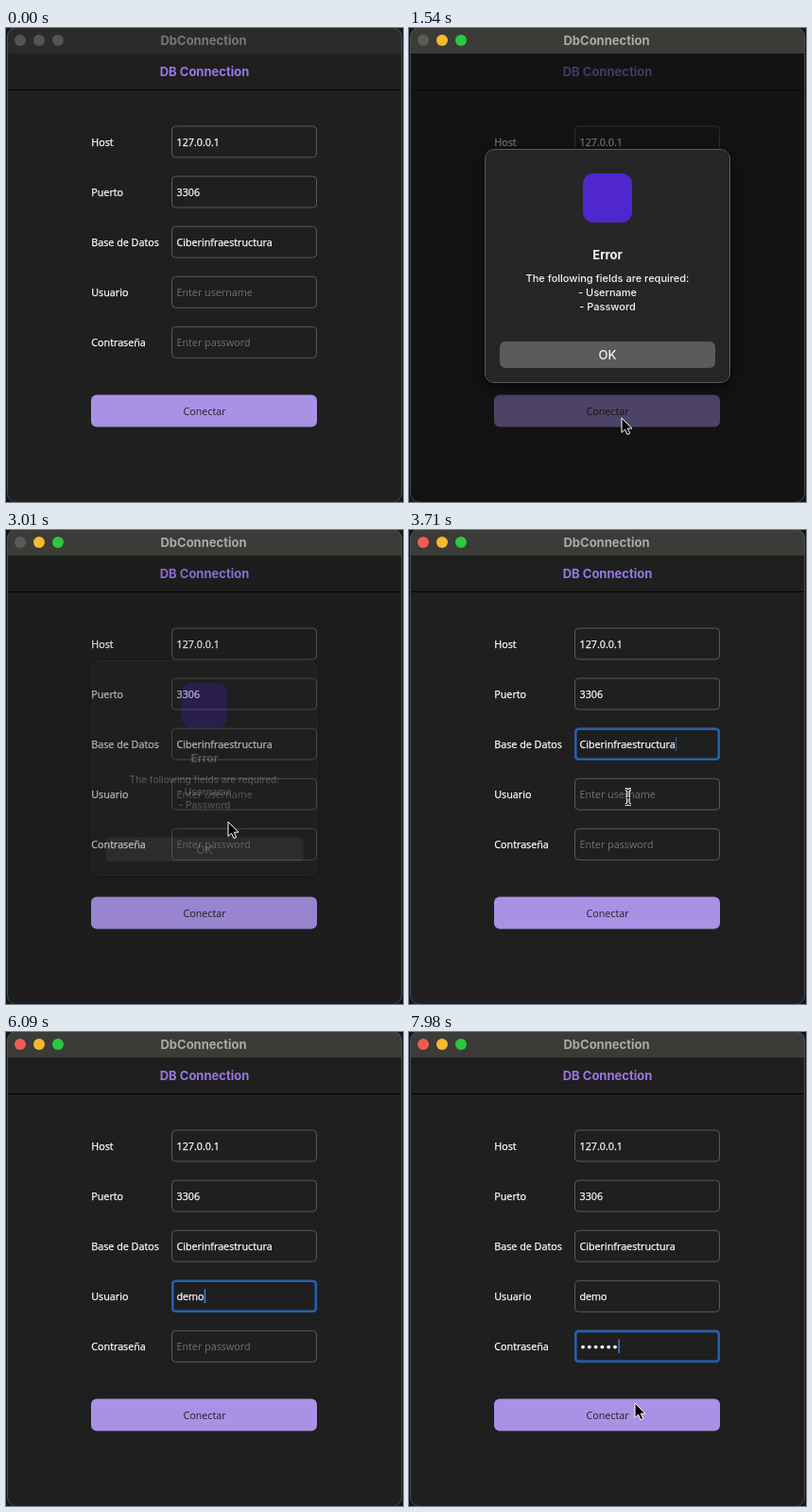
Write an HTML page that moves like this. It is 420 px wide and 502 px high and loops after 8000 ms.

```html
<!DOCTYPE html>
<html lang="es">
<head>
<meta charset="utf-8">
<title>DbConnection</title>
<style>
  html, body { margin: 0; width: 100%; height: 100%; overflow: hidden; background: #10181d; }
  svg { display: block; width: 420px; height: 502px; }
  text { font: 10.76px "Open Sans", sans-serif; }
  .ui { font: 500 11px Inter, sans-serif; text-anchor: middle; fill: #f4f4f4; }
  .bold { font-size: 13px; font-weight: 700; }
  .mid { text-anchor: middle; }
  .form { fill: #fff; stroke: #fff; stroke-width: .25px; }
  .hint { fill: #737373; stroke: none; }
  .box { fill: #1f1f1f; stroke: #5a5a5a; }
  .focus { fill: none; stroke: #2560ac; stroke-width: 2.6; }
  #alert, #popup { filter: drop-shadow(0 5px 6px rgba(0, 0, 0, .5)); }
</style>
</head>
<body>
<svg viewBox="0 0 420 502">
  <clipPath id="frame"><rect x="1" y="-1" width="418" height="503" rx="10"/></clipPath>
  <g clip-path="url(#frame)">
    <rect width="420" height="502" fill="#1f1f1f"/>
    <text class="ui bold" x="210" y="51" style="fill:#9877e4">DB Connection</text>
    <path d="M0 65.5H420" stroke="#050505"/>
    <g id="form"></g>
    <rect x="90" y="388.5" width="239" height="34" rx="6" fill="#a992e6"/>
    <text class="mid" x="210" y="409.8" fill="#1f1f1f">Conectar</text>
    <rect id="dim" y="27" width="420" height="475" fill="#0c0c0c"/>
    <rect id="bar" width="420" height="27"/>
    <text id="title" class="ui bold" x="209" y="17.5">DbConnection</text>
    <circle id="red" cx="15" cy="13" r="6"/>
    <circle id="yellow" cx="35" cy="13" r="6"/>
    <circle id="green" cx="55" cy="13" r="6"/>
  </g>
  <rect x="1.5" y="-.5" width="417" height="503" rx="10" fill="none" stroke="#555" stroke-opacity=".8"/>

  <g id="alert">
    <rect x="80" y="128" width="260" height="248" rx="10" fill="#262626" stroke="#080808" stroke-width="2"/>
    <rect x="80.5" y="128.5" width="259" height="247" rx="9.5" fill="none" stroke="#5c5c5c"/>
    <rect x="184" y="154" width="52" height="52" rx="11" fill="#5027cf"/>
    <text class="ui bold" x="210" y="245">Error</text>
    <text class="ui" x="210" y="269">The following fields are required:</text>
    <text class="ui" x="210" y="284">- Username</text>
    <text class="ui" x="210" y="299">- Password</text>
    <rect id="ok" x="96" y="332" width="228" height="28" rx="6"/>
    <text class="ui" x="210" y="350.5" style="font-size:13px">OK</text>
  </g>

  <g id="popup">
    <rect x="178.5" y="354.5" width="98" height="34" rx="6" fill="#303030" stroke="#555"/>
    <text class="ui" x="227.5" y="375.5">Passwords…</text>
  </g>

  <g id="ring" fill="none">
    <circle r="20" stroke="#000" stroke-width="5.5"/>
    <circle r="20" stroke="#fff" stroke-width="2.2"/>
  </g>
  <path id="arrow" d="M0 0V15.4L3.6 12.2L6 17.6L8.7 16.4L6.3 11.1H11Z" fill="#000" stroke="#fff"/>
  <g id="beam" fill="none">
    <path id="stem" d="M-3-8Q0-8 0-6Q0-8 3-8M0-6V6M-3 8Q0 8 0 6Q0 8 3 8M-2 1H2" stroke="#fff" stroke-width="3"/>
    <use href="#stem" style="stroke:#000"/>
    <path d="M-3-8Q0-8 0-6Q0-8 3-8M0-6V6M-3 8Q0 8 0 6Q0 8 3 8M-2 1H2" stroke="#000" stroke-width="1.1"/>
  </g>
</svg>
<script>
const LOOP = 8000, STEP = 70;
const $ = id => document.getElementById(id);
const clamp = v => Math.max(0, Math.min(1, v));
const show = (el, on) => el.setAttribute('opacity', Number(on));
const paint = (id, color) => $(id).style.fill = color;

const rows = [
  ['Host', '127.0.0.1'],
  ['Puerto', '3306'],
  ['Base de Datos', 'Ciberinfraestructura'],
  ['Usuario', '', 'Enter username'],
  ['Contraseña', '', 'Enter password']
];
const userKeys = [5320, 5880, 5950, 6090];
const passKeys = [7140, 7210, 7280, 7420, 7560, 7630];

// time, x, y of the pointer
const route = [
  [420, 322, 488], [560, 267, 446], [700, 231, 418], [770, 225, 413],
  [1610, 225, 413], [2170, 233, 284], [2450, 236, 338],
  [2800, 236, 338], [3010, 235, 309], [3150, 232, 283],
  [5320, 231.5, 282], [7630, 236, 322], [7980, 239, 393]
];
// start, end, x, y of each click mark
const clicks = [
  [980, 1120, 225, 415], [2660, 2800, 236, 340],
  [3290, 3430, 232, 286], [4410, 4620, 231, 283, .8]
];

$('form').innerHTML = rows.map(([label], i) => {
  const y = 104 + i * 53.1;
  return `<rect class="box" x="175.5" y="${y}" width="153" height="33" rx="4"/>
    <rect class="focus" x="176.3" y="${y + .5}" width="151.5" height="32" rx="3"/>
    <text class="form" x="90.3" y="${y + 20.8}">${label}</text>
    <text class="form value" x="180.5" y="${y + 20.8}"></text>
    <g class="dots" fill="#fff"></g>
    <rect class="caret" y="${y + 9}" width="1.4" height="15" fill="#3f83e2"/>`;
}).join('');
const all = name => [...document.querySelectorAll('.' + name)];
const [focusRings, values, carets] = ['focus', 'value', 'caret'].map(all);
const dots = all('dots')[4];
dots.innerHTML = passKeys.map((_, i) => `<circle cx="${184 + i * 6.8}" cy="333.6" r="1.9"/>`).join('');

function pointer(t) {
  const next = route.findIndex(p => p[0] > t);
  if (next < 0) return route[route.length - 1].slice(1);
  if (next === 0) return route[0].slice(1);
  const [t0, x0, y0] = route[next - 1], [t1, x1, y1] = route[next];
  const k = (t - t0) / (t1 - t0);
  return [x0 + (x1 - x0) * k, y0 + (y1 - y0) * k];
}

function focusedRow(t) {
  if (t >= 6650) return 4;
  if (t >= 4760) return 3;
  return (t >= 980 && t < 2800) || t >= 3570 ? 2 : -1;
}

function caretAlpha(t) {
  if (t < 3710 || t >= 4200) return 1;
  if (t < 3780) return .5;
  return t < 4060 ? 0 : (t - 4060) / 140 * .6 + .2;
}

function drawForm(t) {
  const typed = keys => keys.filter(k => t >= k).length;
  const user = 'demo'.slice(0, typed(userKeys)), count = typed(passKeys);
  const focus = focusedRow(t);
  rows.forEach(([, text, hint], i) => {
    const value = i === 3 ? user : text;
    const empty = !value && !(i === 4 && count);
    values[i].textContent = value || (empty ? hint : '');
    values[i].classList.toggle('hint', empty);
    show(focusRings[i], i === focus);
    const width = i === 4 ? count * 6.8 : value ? values[i].getComputedTextLength() : 0;
    carets[i].setAttribute('x', 180.6 + width);
    show(carets[i], i === focus ? caretAlpha(t) : 0);
  });
  [...dots.children].forEach((dot, i) => show(dot, i < count));
  show($('popup'), t >= 6720 && t < 7140);
}

function drawWindow(t) {
  const active = t >= 980, modal = t >= 1120 && t < 3220;
  paint('bar', active ? '#3b3b38' : '#2b2b2b');
  paint('title', active ? '#aaaaa8' : '#777');
  paint('red', !active ? '#545454' : modal ? '#5b5b59' : '#ee5c54');
  paint('yellow', active ? '#f6b92f' : '#545454');
  paint('green', active ? '#2cc840' : '#545454');
}

function drawAlert(t) {
  const opening = clamp((t - 1120) / 280), closing = clamp((t - 2870) / 280);
  const scale = .88 + .12 * opening - .16 * closing;
  const alert = $('alert');
  show(alert, opening ** .7 * (1 - closing) ** 2);
  alert.setAttribute('transform', `translate(210 252) scale(${scale}) translate(-210 -252)`);
  show($('dim'), .58 * opening ** 1.3 * (1 - closing) ** 2.5);
  paint('ok', t >= 2660 && t < 2800 ? '#838383' : '#5b5b5b');
}

function drawPointer(t) {
  const [x, y] = pointer(t);
  const visible = (t >= 420 && t < 5320) || t >= 7700;
  const beam = t >= 3150 && y < 350;
  for (const id of ['arrow', 'beam']) {
    $(id).setAttribute('transform', `translate(${x} ${y})`);
    show($(id), visible && beam === (id === 'beam'));
  }
  const click = clicks.find(([from, to]) => t >= from && t < to);
  show($('ring'), !!click);
  if (click) $('ring').setAttribute('transform', `translate(${click[2]} ${click[3]}) scale(${click[4] || 1})`);
}

function draw() {
  const t = Math.floor(performance.now() % LOOP / STEP) * STEP;
  drawForm(t);
  drawWindow(t);
  drawAlert(t);
  drawPointer(t);
  requestAnimationFrame(draw);
}
draw();
</script>
</body>
</html>
```
